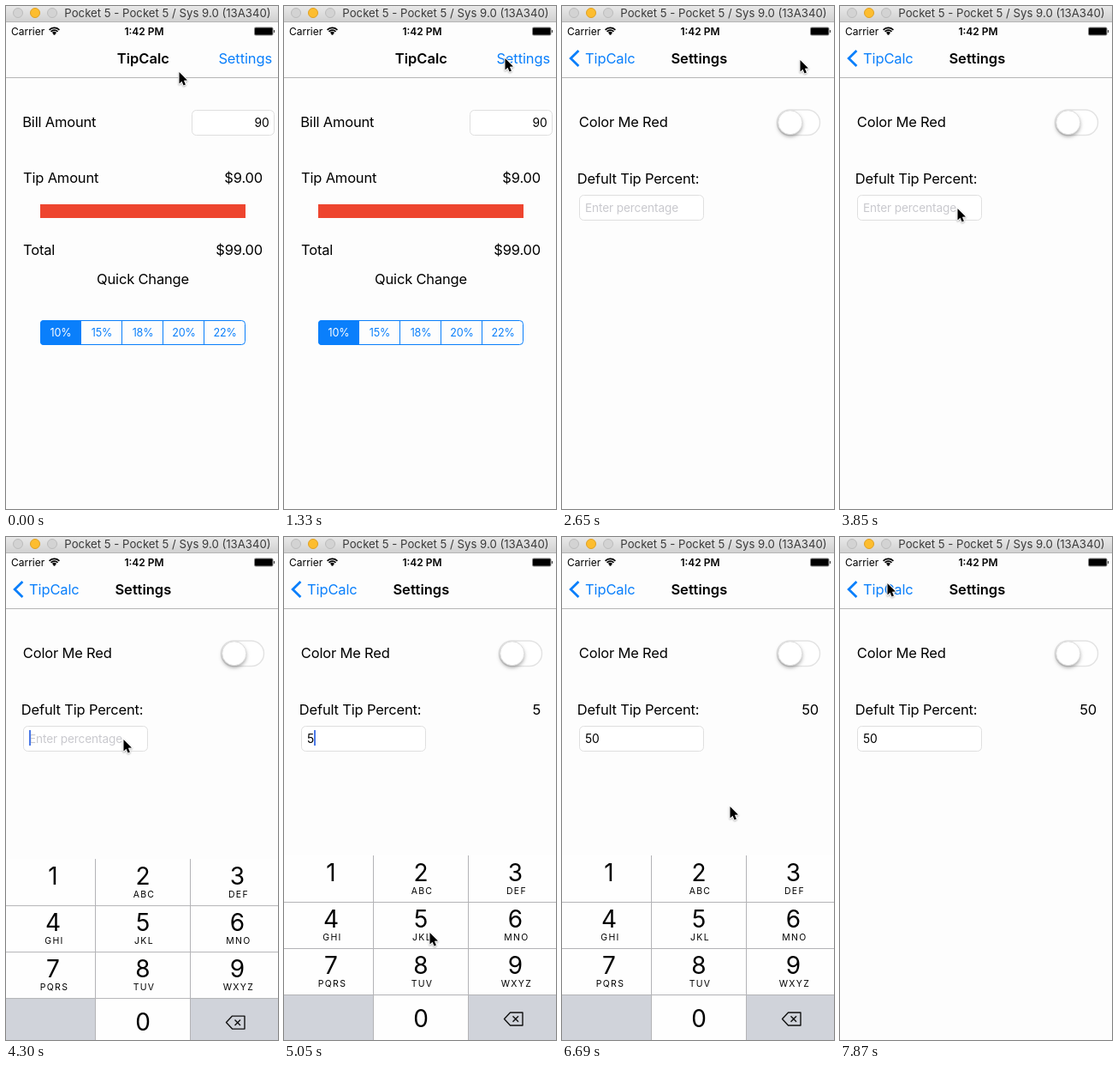
These frames come from a looping animation (318 px wide and 586 px high, 8000 ms). An HTML page with a canvas:

```html
<!DOCTYPE html>
<html lang="en">
<head>
<meta charset="utf-8">
<title>Tip calculator</title>
<style>
  html, body { margin: 0; width: 100%; height: 100%; overflow: hidden; background: #fdfdfd; }
  canvas { display: block; width: 318px; height: 586px; }
</style>
</head>
<body>
<canvas></canvas>
<script>
const W = 318, H = 586, LOOP = 8000, TICK = 148.4;
const BLUE = '#0a7ffb', PAPER = '#fdfdfd', KEY_GRAY = '#d0d3da', LINE = '#b3b3b6';
const canvas = document.querySelector('canvas');
const ctx = canvas.getContext('2d');
const ratio = window.devicePixelRatio || 1;
canvas.width = W * ratio;
canvas.height = H * ratio;

// Tracks: [tick, value...], linear in between.
const PUSH = [[13, 0], [14, .03], [15, .286], [16, .82], [17, .97], [18, 1]];
const KEYBOARD = [[26, 0], [27, .25], [28, .8], [29, .981], [30, 1],
                  [46, 1], [47, .85], [48, .4], [49, .05], [50, 0]];
const POINTER = [[5, 201, 76], [10, 271, 56], [11, 277, 62], [21, 277, 62],
                 [26, 136, 235], [29, 136, 235], [33, 169, 460], [35, 169, 460],
                 [38, 150, 566], [40, 150, 566], [45, 195, 313], [47, 195, 313],
                 [51, 54, 1], [52, 54, 1], [53, 54, 53]];

const clamp = v => Math.max(0, Math.min(1, v));

function at(track, tick) {
  if (tick <= track[0][0]) return track[0].slice(1);
  for (let i = 1; i < track.length; i++) {
    const a = track[i - 1], b = track[i];
    if (tick <= b[0]) {
      const u = (tick - a[0]) / (b[0] - a[0]);
      return a.slice(1).map((v, k) => v + (b[k + 1] - v) * u);
    }
  }
  return track[track.length - 1].slice(1);
}

function text(str, x, y, { size = 16.5, color = '#000', align = 'left', weight = 400, spacing = -.18, alpha = 1 } = {}) {
  if (alpha <= 0) return;
  ctx.globalAlpha = alpha;
  ctx.font = `${weight} ${size}px Inter, Roboto, sans-serif`;
  ctx.letterSpacing = spacing + 'px';
  ctx.textAlign = align;
  ctx.fillStyle = color;
  ctx.fillText(str, x, y);
  ctx.globalAlpha = 1;
}

function rect(x, y, w, h, color) {
  ctx.fillStyle = color;
  ctx.fillRect(x, y, w, h);
}

function disc(x, y, r, fill, stroke) {
  ctx.beginPath();
  ctx.arc(x, y, r, 0, Math.PI * 2);
  ctx.fillStyle = fill;
  ctx.fill();
  if (stroke) outline(stroke, 1);
}

function outline(color, width) {
  ctx.strokeStyle = color;
  ctx.lineWidth = width;
  ctx.stroke();
}

function path(points, close) {
  ctx.beginPath();
  points.forEach(([x, y]) => ctx.lineTo(x, y));
  if (close) ctx.closePath();
}

function roundBox(x, y, w, h, r, fill) {
  ctx.beginPath();
  ctx.roundRect(x, y, w, h, r);
  if (fill) {
    ctx.fillStyle = fill;
    ctx.fill();
  }
}

function field(x, y, w, h) {
  roundBox(x + .5, y + .5, w - 1, h - 1, 5, '#fff');
  outline('#dfdfdf', 1);
}

function windowBar() {
  const shade = ctx.createLinearGradient(0, 0, 0, 18);
  shade.addColorStop(0, '#e9e9e9');
  shade.addColorStop(1, '#d1d1d1');
  rect(0, 0, W, 18, shade);
  rect(0, 18, W, 1, '#b5b5b5');
  disc(14, 8, 5.5, '#d3d3d3', '#bcbcbc');
  disc(34, 8, 5.5, '#fdbd2f', '#dfa023');
  disc(54, 8, 5.5, '#d3d3d3', '#bcbcbc');
  text('Pocket 5 - Pocket 5 / Sys 9.0 (13A340)', 189, 13, { size: 13.2, color: '#3a3a3a', align: 'center', spacing: 0 });
}

function statusBar() {
  text('Carrier', 6, 34, { size: 12, spacing: 0 });
  for (const r of [3.5, 6.2, 8.9]) {
    ctx.beginPath();
    ctx.arc(56.5, 33.5, r - .8, -Math.PI * .76, -Math.PI * .24);
    outline('#000', 1.7);
  }
  disc(56.5, 32.5, 1.3, '#000');
  text('1:42 PM', 161.5, 34, { size: 12, weight: 600, align: 'center', spacing: 0 });
  roundBox(290, 24.5, 22.5, 10, 2, '#8a8a8a');
  roundBox(291, 25.5, 20.5, 8, 1, '#000');
  rect(313, 28, 1, 3, '#333');
}

function navBar(p) {
  rect(0, 19, W, 64, PAPER);
  rect(0, 83, W, 1, '#b6b6b6');
  statusBar();
  const rest = 1 - p;
  const title = { weight: 600, align: 'center', spacing: 0 };
  text('TipCalc', 160.3 - 77 * p, 67, { ...title, alpha: clamp(1 - 1.9 * p) });
  text('Settings', 160.3 + 213 * rest, 67, { ...title, alpha: clamp(1.6 * p) });
  text('Settings', 311, 67, { color: BLUE, align: 'right', spacing: -.12, alpha: clamp(1 - 2.6 * p) });

  const back = clamp((p - .4) / .6);
  text('TipCalc', 27 + 77 * rest, 67, { color: BLUE, spacing: -.12, alpha: back });
  ctx.globalAlpha = back;
  path([[19.4, 52], [10.2, 61], [19.4, 70]]);
  outline(BLUE, 2.8);
  ctx.globalAlpha = 1;
}

function segments() {
  const x = 40, y = 366, w = 48, h = 29;
  ctx.save();
  roundBox(x, y, w * 5, h, 4);
  ctx.clip();
  rect(x, y, w, h, BLUE);
  ctx.restore();
  roundBox(x + .5, y + .5, w * 5 - 1, h - 1, 4);
  outline(BLUE, 1);
  ['10%', '15%', '18%', '20%', '22%'].forEach((label, i) => {
    if (i) rect(x + w * i - 1, y, 1, h, BLUE);
    text(label, x + w * (i + .5), 385, { size: 12.6, align: 'center', color: i ? BLUE : '#fff' });
  });
}

function calculator() {
  rect(0, 84, W, H - 84, PAPER);
  text('Bill Amount', 19.2, 141);
  field(217, 121, 97, 30);
  text('90', 307.5, 140.5, { size: 13.8, align: 'right' });
  text('Tip Amount', 20, 206);
  text('$9.00', 300, 206, { align: 'right' });
  rect(40, 231, 240, 16, '#ee452f');
  text('Total', 20, 290);
  text('$99.00', 300, 290, { align: 'right' });
  text('Quick Change', 160, 324, { align: 'center' });
  segments();
}

function toggle() {
  roundBox(251.5, 121, 50, 29.5, 14.75, '#fff');
  outline('#e3e3e3', 1.5);
  ctx.save();
  ctx.shadowColor = 'rgba(0,0,0,.35)';
  ctx.shadowBlur = 4 * ratio;
  ctx.shadowOffsetY = 2.5 * ratio;
  disc(266.8, 135.7, 14, '#fff');
  ctx.restore();
  disc(266.8, 135.7, 14, '#fff', '#dcdcdc');
}

function settings(tick) {
  const entry = tick >= 39 ? '50' : tick >= 34 ? '5' : '';
  rect(0, 84, W, H - 84, PAPER);
  text('Color Me Red', 19.8, 141);
  toggle();
  text('Defult Tip Percent:', 17.8, 207);
  text(entry, 300, 207, { align: 'right' });
  field(20, 220, 146, 30);
  if (entry) text(entry, 27, 239.5, { size: 13.8 });
  else text('Enter percentage', 27, 239.5, { size: 13.6, color: '#c9c9ce', spacing: -.1 });
  if (tick >= 27 && tick < 43) rect(27 + 8 * entry.length, 225, 2, 18, '#4a78e6');
}

function keypad(tick, shown) {
  if (shown <= 0) return;
  const rows = [0, 54, 108, 162], cols = [0, 104, 215, W];
  const centers = [55, 160, 270.4];
  const letters = ['', 'ABC', 'DEF', 'GHI', 'JKL', 'MNO', 'PQRS', 'TUV', 'WXYZ'];
  const pressed = tick === 33 ? 4 : tick === 38 ? 10 : -1;
  ctx.save();
  ctx.translate(0, 371 + 215 * (1 - shown));
  for (let i = 0; i < 12; i++) {
    const c = i % 3, r = Math.floor(i / 3);
    const gray = i === 9 || i === 11 || i === pressed;
    rect(cols[c], rows[r], cols[c + 1] - cols[c], 54, gray ? KEY_GRAY : '#fefefe');
    if (i < 9 || i === 10) {
      text(i < 9 ? i + 1 : 0, centers[c], i < 9 ? rows[r] + 30 : 199.5, { size: 28, align: 'center', spacing: 0 });
    }
    if (i < 9) text(letters[i], centers[c] + 1.5, rows[r] + 45, { size: 10.5, align: 'center', spacing: 1.3 });
  }
  for (const x of [104, 215]) rect(x, 0, 1, 215, LINE);
  for (const y of [54, 108, 162]) rect(0, y, W, 1, LINE);

  ctx.lineJoin = 'round';
  path([[257.5, 190.5], [264.5, 183], [279, 183], [279, 198], [264.5, 198]], true);
  outline('#111', 1.4);
  path([[267.5, 187.3], [274, 193.8]]);
  outline('#111', 1.4);
  path([[274, 187.3], [267.5, 193.8]]);
  outline('#111', 1.4);
  ctx.restore();
}

function pointer([x, y]) {
  ctx.save();
  ctx.translate(x + 1, y + 1);
  path([[.5, 0], [.5, 13.5], [3.5, 10.7], [5.6, 15.4], [7.9, 14.4], [5.9, 9.8], [10, 9.6]], true);
  ctx.lineJoin = 'round';
  ctx.shadowColor = 'rgba(0,0,0,.3)';
  ctx.shadowBlur = 2 * ratio;
  ctx.shadowOffsetY = ratio;
  outline('#fff', 2);
  ctx.shadowColor = 'transparent';
  ctx.fillStyle = '#000';
  ctx.fill();
  ctx.restore();
}

function pages(tick, p) {
  if (p < 1) {
    ctx.save();
    ctx.translate(-Math.round(97 * p), 0);
    calculator();
    ctx.restore();
  }
  if (p <= 0) return;
  const edge = Math.round(W * (1 - p));
  if (p < 1) {
    rect(0, 84, W, H - 84, 'rgba(0,0,0,.02)');
    const shade = ctx.createLinearGradient(edge - 6, 0, edge, 0);
    shade.addColorStop(0, 'rgba(0,0,0,0)');
    shade.addColorStop(1, 'rgba(0,0,0,.22)');
    rect(edge - 6, 84, 6, H - 84, shade);
  }
  ctx.save();
  ctx.translate(edge, 0);
  settings(tick);
  ctx.restore();
  if (p < 1) rect(edge, 84, W - edge, H - 84, 'rgba(0,0,0,.015)');
}

function draw(now) {
  // The screen refreshes at a fixed coarse rate.
  const tick = Math.floor((now % LOOP + 22) / TICK);
  const [push] = at(PUSH, tick);
  const [shown] = at(KEYBOARD, tick);
  ctx.setTransform(ratio, 0, 0, ratio, 0, 0);
  rect(0, 0, W, H, PAPER);
  pages(tick, push);
  navBar(push);
  keypad(tick, shown);
  windowBar();
  pointer(at(POINTER, tick));
}

const start = performance.now();
function loop() {
  draw(performance.now() - start);
  requestAnimationFrame(loop);
}
loop();
</script>
</body>
</html>
```
